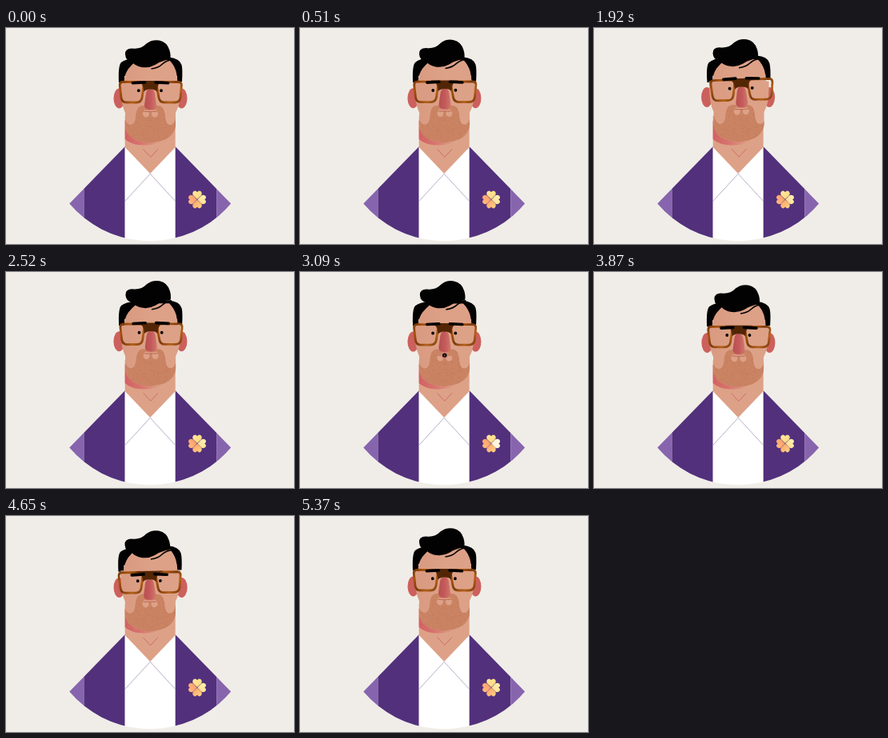
These frames come from a looping animation (360x270 px, 5.4 s). An HTML page with a canvas:

```html
<!DOCTYPE html>
<html lang="en">
<head>
<meta charset="utf-8">
<title>Portrait</title>
<style>
html, body { margin: 0; width: 100%; height: 100%; overflow: hidden; background: #f0ede8; }
canvas { display: block; width: 360px; height: 270px; }
</style>
</head>
<body>
<canvas id="stage"></canvas>
<script>
const LOOP = 5400;
const canvas = document.getElementById('stage');
const ctx = canvas.getContext('2d');
const ratio = window.devicePixelRatio || 1;
canvas.width = 360 * ratio;
canvas.height = 270 * ratio;

const skin = '#dda187';
const purple = '#52307c';
const lilac = '#8765ae';
const black = '#030203';
const beardTone = '#ca8464';
const shirtLeft = 148.7;
const shirtRight = 211.7;

// Poses: time, gaze x/y, hair x/y, tilt
const poses = [
  [0, 0, 0, 0.5, 0, 0],
  [450, 0.3, -0.3, 0.5, -0.5, 0],
  [900, 4, -3, 0.7, -2, -0.03],
  [1950, 4, -3, 0, -1.2, -0.03],
  [2650, 0.4, -2.5, 1, -4.5, 0],
  [3250, 0.3, -1.8, 1.5, -4, 0],
  [3850, 0.5, 0.8, 2, 1, 0],
  [4650, -1, 2.8, 0, 3, -0.015],
  [5400, 0, 0, 0.5, 0, 0]
];

const shapes = {
  face: 'M143.5 67.5 H147.5 Q148 58 153 51 Q157 46 164 40 H204 Q210 46 212.5 54 Q214 60 214.5 67.5 H218 V78 Q218 95 212 106 V122 Q210 141 180.5 143.5 Q151 142 149 122 V106 Q143.5 95 143.5 74 Z',
  beard: 'M140 106 H147 Q149 121 156 121 Q161.5 120 162 111 Q163 97 171 97 H190 Q198 97 199 111 Q200 121 205 121 Q212 121 213 106 H220 V150 H140 Z',
  backHair: 'M141 68 Q140 47 144 43 Q150 38.5 160 38 L204 36.5 Q217 38 219.5 46 Q221 52 220 67 H214 V60 H148 V68 Z',
  curl: 'M148.5 33 Q148 25.5 157 25.5 Q168 27 175 19.5 Q182 14 191 15.5 Q201 17.5 204 28 Q206 35 204.5 39.5 Q195 40 186 46 Q177 51 167 48.5 Q161 47 157 42.5 Q149 41 148.5 33 Z',
  strand: 'M181 51 Q190 50 195 45 Q200 40.5 206 40',
  lensLeft: 'M145 67.5 H168 Q172 68 172 73 L170 87 Q169 93 163 93 H150 Q145 93 144 87 L142.3 72 Q142 68 145 67.5 Z',
  lensRight: 'M192 67.5 H216 Q219.7 68 219.4 72 L218 87 Q217 93 211 93 H198 Q192 93 191 87 L188.5 73 Q188 68 192 67.5 Z',
  bridge: 'M163 66 H198 L192 69 Q189 72 189 80 Q187 76.5 180.5 76.5 Q174 76.5 172 80 Q172 72 169 69 Z',
  nose: 'M175 82 Q176 76 180.5 76 Q185 76 186 82 L188 96 Q188 102 180.5 102 Q173 102 173 96 Z',
  heart: 'M0 -0.4 L-5 -5.2 Q-6.8 -8 -4.4 -10.4 Q-1.6 -12 0 -9.2 Q1.6 -12 4.4 -10.4 Q6.8 -8 5 -5.2 Z'
};
for (const key in shapes) shapes[key] = new Path2D(shapes[key]);

let seed = 17;
function random() {
  seed = (seed * 16807) % 2147483647;
  return seed / 2147483647;
}
const grain = Array.from({ length: 650 }, () => [146 + random() * 68, 97 + random() * 50]);

function fill(path, color) {
  ctx.fillStyle = color;
  ctx.fill(path);
}

function stroke(path, color, width) {
  ctx.strokeStyle = color;
  ctx.lineWidth = width;
  ctx.stroke(path);
}

function line(points, color, width) {
  const path = new Path2D();
  points.forEach(([x, y]) => path.lineTo(x, y));
  stroke(path, color, width);
}

function ellipse(x, y, rx, ry, color) {
  ctx.beginPath();
  ctx.ellipse(x, y, rx, ry, 0, 0, Math.PI * 2);
  ctx.fillStyle = color;
  ctx.fill();
}

function gradient(x0, y0, x1, y1, ...colors) {
  const result = ctx.createLinearGradient(x0, y0, x1, y1);
  colors.forEach((color, i) => result.addColorStop(i / (colors.length - 1), color));
  return result;
}

function shifted(x, y, draw, tilt = 0) {
  ctx.save();
  ctx.translate(180.5 + x, 85 + y);
  ctx.rotate(tilt);
  ctx.translate(-180.5, -85);
  draw();
  ctx.restore();
}

function speckle(clip, color) {
  ctx.save();
  ctx.clip(clip);
  ctx.fillStyle = color;
  for (const [x, y] of grain) ctx.fillRect(x, y, 0.8, 0.8);
  ctx.restore();
}

function smooth(u) {
  u = Math.min(1, Math.max(0, u));
  return u * u * (3 - 2 * u);
}

function poseAt(t) {
  const i = poses.findIndex(p => p[0] > t);
  const a = poses[i - 1], b = poses[i];
  const u = smooth((t - a[0]) / (b[0] - a[0]));
  const [gazeX, gazeY, hairX, hairY, tilt] = a.slice(1).map((v, k) => v + (b[k + 1] - v) * u);
  const open = smooth((t - 2500) / 150) * (1 - smooth((t - 3350) / 150));
  const shine = Math.exp(-(((t - 3090) / 250) ** 2));
  return { gazeX, gazeY, hairX, hairY, tilt, open, shine };
}

function drawFlower(x, y, shine) {
  ctx.save();
  ctx.translate(x, y);
  const petals = [['#ffe79a', '#ffd680'], ['#fff0b0', '#ffdc8c'], ['#ffd184', '#ff9f68'], ['#ffbb7d', '#ff9865']];
  petals.forEach(([outer, inner], i) => {
    fill(shapes.heart, gradient(-5, -10, 5, 0, outer, inner));
    if (i === 1) fill(shapes.heart, `rgba(255,250,235,${shine * 0.8})`);
    ctx.rotate(Math.PI / 2);
  });
  ctx.restore();
}

function drawBody(pose) {
  const jacket = new Path2D();
  jacket.moveTo(shirtLeft, 148.3);
  jacket.lineTo(79.3, 219.5);
  jacket.arc(180.2, 133.7, 132.5, Math.PI - Math.atan2(85.8, 100.9), Math.atan2(85.8, 100.9), true);
  jacket.lineTo(shirtRight, 148.3);
  jacket.closePath();
  ctx.save();
  ctx.clip(jacket);
  const edges = [70, 97.5, shirtLeft, shirtRight, 263.2, 290];
  [lilac, purple, '#fff', purple, lilac].forEach((color, i) => {
    ctx.fillStyle = color;
    ctx.fillRect(edges[i], 140, edges[i + 1] - edges[i], 130);
  });
  ctx.restore();
  fill(new Path2D(`M${shirtLeft} 110 H${shirtRight} V149 L180.2 182 L${shirtLeft} 149 Z`), skin);
  line([[shirtLeft, 216.5], [180.2, 182.3], [shirtRight, 216.5]], '#9c8bb0', 0.7);
  drawFlower(239, 214.4, pose.shine);
}

function drawNeck(pose) {
  const shade = new Path2D(`M${shirtLeft} 116 V139 Q158 147 174 146.5 Q188 146 194 141 L190 120 Z`);
  fill(shade, gradient(148, 0, 193, 0, '#d25e62', '#d77770', skin));
  speckle(shade, 'rgba(225,150,128,.35)');
  shifted(pose.gazeX * 0.1, pose.gazeY * 0.1, () =>
    line([[171.5, 151.5], [180.7, 161.5], [190, 151.5]], '#c46365', 0.8));
}

function drawGlasses() {
  for (const [lens, x] of [[shapes.lensLeft, 141], [shapes.lensRight, 188]]) {
    stroke(lens, gradient(x, 66, x + 30, 94, '#6b3008', '#a8540f', '#7c3b0c', '#b5611a', '#7a3a0c'), 2.8);
  }
  fill(shapes.bridge, gradient(163, 0, 198, 0, '#6b3008', '#522504', '#522504', '#6b3008'));
}

function drawMouth(open) {
  ellipse(175, 107, 4, 4.5, skin);
  ellipse(186, 107, 4, 4.5, skin);
  fill(new Path2D('M168 104 Q172 99 180.5 99 Q189 99 193 104 Q187 106 180.5 104 Q174 106 168 104 Z'), beardTone);
  if (open < 0.98) {
    ctx.globalAlpha = 1 - open;
    stroke(new Path2D('M173 103 Q180.5 104.3 188 103'), '#edb49d', 1.2);
    stroke(new Path2D('M173.5 104.3 H187.5'), '#b4524b', 0.7);
    ctx.globalAlpha = 1;
  }
  if (open > 0.02) {
    ellipse(180.5, 104, 4.3 * open, 4.2 * open, '#d4877a');
    ellipse(180.5, 104, 2.8 * open, 2.7 * open, black);
    ellipse(180.5, 104.3, 1.1 * open, 1.1 * open, '#755450');
  }
}

function drawFeatures(pose) {
  shifted(pose.gazeX, pose.gazeY, () => {
    shifted(-pose.gazeX * 0.2, pose.open * 2, () => drawMouth(pose.open));
    fill(shapes.nose, gradient(173, 0, 188, 0, '#b94f50', '#c3595a', '#d2766c'));
    ellipse(165.8, 78.3, 1.9, 2, black);
    ellipse(194, 78.3, 1.9, 2, black);
    drawGlasses();
    ctx.lineCap = 'round';
    shifted(0, pose.gazeY * 0.7, () => {
      line([[158.5, 68.8], [173.5, 68]], black, 3.6);
      line([[187, 68], [202.5, 68.8]], black, 3.6);
    });
    ctx.lineCap = 'butt';
  }, pose.tilt);
}

function drawFace(pose) {
  fill(shapes.face, gradient(143, 0, 219, 0, '#d89a80', skin, skin));
  ctx.save();
  ctx.clip(shapes.face);
  shifted(pose.gazeX * 0.4, 0, () => {
    fill(shapes.beard, beardTone);
    speckle(shapes.beard, 'rgba(180,100,74,.28)');
  });
  ctx.restore();
}

function drawHead(pose) {
  const { gazeX, gazeY, hairX, hairY, tilt } = pose;
  shifted(-gazeX * 0.1, gazeY * 0.5, () => {
    ellipse(141.5, 88, 7, 12.5, '#cc605c');
    ellipse(219.5, 88, 7, 12.5, '#cc605c');
  });
  shifted(gazeX * 0.25, gazeY * 0.4, () => fill(shapes.backHair, black), tilt);
  shifted(gazeX * 0.15, gazeY * 0.3, () => drawFace(pose));
  shifted(hairX, hairY, () => {
    fill(shapes.curl, black);
    stroke(shapes.strand, black, 1.6);
  });
  drawFeatures(pose);
}

function frame(now) {
  const pose = poseAt(now % LOOP);
  ctx.setTransform(ratio, 0, 0, ratio, 0, 0);
  ctx.fillStyle = '#f0ede8';
  ctx.fillRect(0, 0, 360, 270);
  drawBody(pose);
  drawNeck(pose);
  drawHead(pose);
}

const start = performance.now();
function tick() {
  frame(performance.now() - start);
  requestAnimationFrame(tick);
}
tick();
</script>
</body>
</html>
```
